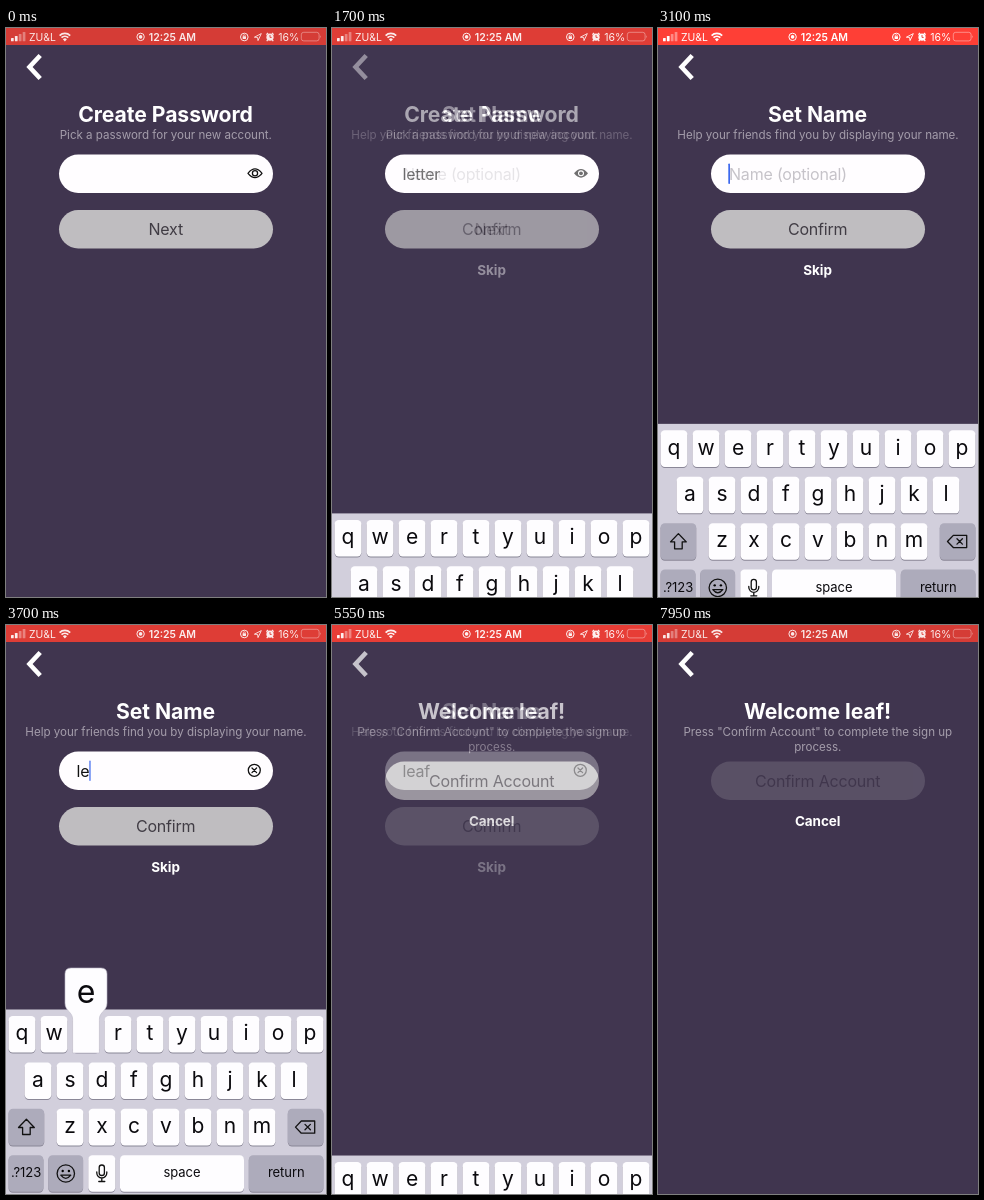
An HTML page that plays this animation: 320 px wide and 569 px high, repeating every 8 s.

```html
<!DOCTYPE html>
<html lang="en">
<head>
<meta charset="utf-8">
<title>Sign up</title>
<style>
html, body { margin: 0; width: 100%; height: 100%; overflow: hidden; background: #40354f; }
svg { display: block; width: 100%; height: 100%; font-family: Inter, Roboto, sans-serif; }
#pages { isolation: isolate; }
#pages > g { mix-blend-mode: plus-lighter; }
.title { font-size: 21.2px; font-weight: 700; letter-spacing: -.08px; fill: #fff; }
.sub { font-size: 11.6px; letter-spacing: -.02px; fill: #a49dab; }
.body { font-size: 16px; letter-spacing: -.2px; }
.link { font-size: 13.5px; font-weight: 700; letter-spacing: -.1px; fill: #fff; }
.key { font-size: 21px; fill: #0b0a0e; }
.cap { font-size: 13px; letter-spacing: -.05px; fill: #0b0a0e; }
.line { fill: none; stroke: #111; stroke-width: 1.3; stroke-linecap: round; stroke-linejoin: round; }
</style>
</head>
<body>
<svg id="stage" viewBox="0 0 320 569" preserveAspectRatio="none"></svg>
<script>
const LOOP = 8000;
const NAME = 'leaf', PASS = 'letter';
const $ = id => document.getElementById(id);
const clamp = v => Math.max(0, Math.min(1, v));

const text = (x, y, cls, s, more = 'text-anchor="middle"') =>
  `<text x="${x}" y="${y}" class="${cls}" ${more}>${s}</text>`;
const box = (x, y, w, h, r, fill, more = '') =>
  `<rect x="${x}" y="${y}" width="${w}" height="${h}" rx="${r}" fill="${fill}" ${more}/>`;
const line = (d, more = '') => `<path class="line" d="${d}" ${more}/>`;
const circle = (x, y, r, more) => `<circle cx="${x}" cy="${y}" r="${r}" ${more}/>`;

// Pages
const back = '<path id="back" d="M34.2 27.5L23.5 39L34.2 50.5" fill="none" stroke="#fff" stroke-width="4.6"/>';
const button = (id, y, label) =>
  `<g id="${id}">${box(53, y, 214, 38.5, 19.25, '#bfbdc0')}${text(159.7, y + 25.3, 'body', label, 'text-anchor="middle" fill="#403c44"')}</g>`;
const field = (id, extra) =>
  box(53, 126.5, 214, 38.5, 19.25, '#fffdff') + extra +
  text(70.5, 151.5, 'body', '', `id="${id}" fill="#111"`) +
  box(70, 135.5, 1.7, 20.5, .8, '#3d68ee', `id="${id}Caret"`);
const page = (id, title, body) =>
  `<g id="${id}">${box(0, 0, 320, 569, 0, '#40354f')}${text(159.5, 94, 'title', title)}${body}</g>`;

const lid = 'M242 145.3Q249 136.6 256 145.3Q249 154 242 145.3Z';
const eyes =
  `<g id="eyeOpen">${line(lid)}${circle(249, 145.3, 2.6, 'class="line"')}</g>` +
  `<g id="eyeFull"><path d="${lid}"/>${circle(249, 145.3, 3, 'fill="#fff"')}${circle(249, 145.3, 1.9, '')}</g>`;
const clear = `<g id="clear">${circle(248.3, 145.3, 6, 'class="line"')}${line('M246 143l4.6 4.6M250.6 143l-4.6 4.6')}</g>`;

const pages =
  page('welcome', `Welcome ${NAME}!`,
    text(159.8, 111, 'sub', 'Press "Confirm Account" to complete the sign up') +
    text(159.8, 125.5, 'sub', 'process.') +
    button('finish', 136.5, 'Confirm Account') + text(159.6, 201, 'link', 'Cancel')) +
  page('setName', 'Set Name',
    text(160, 111, 'sub', 'Help your friends find you by displaying your name.') +
    field('name', text(71, 151.5, 'body', 'Name (optional)', 'id="hint" fill="#c6c3c9"') + clear) +
    button('confirm', 182, 'Confirm') + text(159.6, 246.7, 'link', 'Skip')) +
  page('password', 'Create Password',
    text(159.8, 111, 'sub', 'Pick a password for your new account.') +
    field('pass', eyes) + button('next', 182, 'Next'));

// Keyboard
const ROWS = [['qwertyuiop', 16, 391], ['asdfghjkl', 32, 437.4], ['zxcvbnm', 64, 483.8]];
const DARK = '#adabbb';
const keyBox = (x, y, w, fill = '#fefdff') =>
  box(x, y + 1, w, 36.6, 4.2, '#8a8797') + box(x, y, w, 36.6, 4.2, fill);
const mic = x =>
  box(x - 2.6, 540, 5.2, 10.5, 2.6, 'none', 'class="line"') +
  line(`M${x - 5} 547v1a5 5 0 0 0 10 0v-1M${x} 553v3.5M${x - 3} 556.5h6`);
const space = (x, w) => keyBox(x, 530.2, w) + text(x + w / 2, 552.4, 'cap', 'space');

const letters = ROWS.map(([chars, x0, y]) => [...chars].map((c, i) =>
  keyBox(x0 + 32 * i - 13.4, y, 26.8) + text(x0 + 32 * i, y + 24.3, 'key', c)).join('')).join('');
const keyboard = `<g id="keyboard">${box(0, 384.5, 320, 190, 0, '#d2cfdc')}${letters}` +
  keyBox(2.6, 483.8, 35.6, DARK) +
  line('M20.4 494.3L28.3 502.5H24.2V509.5H16.6V502.5H12.5Z') +
  keyBox(281.8, 483.8, 35.6, DARK) +
  line('M289.5 502.1L295.3 496H308.7V508.2H295.3ZM299 499.4l5.4 5.4M304.4 499.4l-5.4 5.4') +
  keyBox(2.6, 530.2, 34.8, DARK) + text(20, 552.4, 'cap', '.?123') +
  keyBox(242.8, 530.2, 74.6, DARK) + text(280.3, 552.4, 'cap', 'return') +
  `<g id="plainRow">${keyBox(42.3, 530.2, 34.8, DARK)}${mic(59.8)}${space(82, 156)}</g>` +
  `<g id="emojiRow">${keyBox(42.3, 530.2, 34.8, DARK)}${circle(59.8, 548.5, 8.7, 'class="line"')}` +
  circle(56.7, 546, 1.2, '') + circle(62.9, 546, 1.2, '') + line('M54.8 550.2q5 6.4 10 0z') +
  keyBox(82.3, 530.2, 27) + mic(95.8) + space(114, 124) + '</g>' +
  '<g id="popup"><path d="M-13.4 37V3C-13.4 -4 -21 -5 -21 -13V-42Q-21 -48 -15 -48H15Q21 -48 21 -42V-13C21 -5 13.4 -4 13.4 3V37Z" fill="#fefdff" stroke="#bbb8c6" stroke-width=".6"/>' +
  text(0, -13, 'key', '', 'id="popChar" text-anchor="middle" style="font-size:32px"') + '</g></g>';

// Status bar
const white = 'fill="none" stroke="#fff"';
const bars = [0, 1, 2, 3].map(i =>
  box(5 + 3.9 * i, 10 - 2 * i, 2.7, 3.3 + 2 * i, .6, '#fff', i > 1 ? 'opacity=".4"' : '')).join('');
const status = box(0, 0, 320, 17, 0, '#d63c37', 'id="bar"') + '<g id="info" fill="#fff">' + bars +
  text(23, 12.7, '', 'ZU&amp;L', 'font-size="10.4"') +
  `<path d="M53.6 7.6a7.6 7.6 0 0 1 10.6 0M55.5 9.7a4.9 4.9 0 0 1 6.8 0" ${white} stroke-width="1.7"/>` +
  '<path d="M56.9 11.2a3 3 0 0 1 4 0l-2 2.2z"/>' +
  circle(134.6, 8.9, 3.7, white) + circle(134.6, 8.9, 1.8, '') +
  text(166.4, 12.7, '', '12:25 AM', 'font-size="10.5" font-weight="600" text-anchor="middle"') +
  circle(238.3, 9, 3.8, white) + box(236.6, 8.3, 3.4, 2.6, .4, '#fff') +
  `<path d="M237.3 8.5v-.8a1 1 0 0 1 2 0v.8" ${white} stroke-width=".7"/>` +
  `<path d="M248.4 9.2L255.3 5.6L252 12.6L251.6 9.4Z" ${white} stroke-linejoin="round" stroke-width=".9"/>` +
  circle(264, 9.2, 3.6, '') +
  `<path d="M260.3 6.6l1.8-1.6M267.7 6.6l-1.8-1.6M261.7 12l-1 1.2M266.3 12l1 1.2" ${white} stroke-width="1.2"/>` +
  '<path d="M264 7v2.4h1.7" fill="none" stroke="#e03d37" stroke-width=".9"/>' +
  text(272.3, 12.7, '', '16%', 'font-size="10.5"') +
  box(295.3, 4.3, 17.8, 8.6, 2.4, 'none', 'stroke="#fff" stroke-opacity=".45" stroke-width=".9"') +
  '<path d="M314.3 7.2q1.6 1.4 0 2.8z" opacity=".5"/></g>';

$('stage').innerHTML = `<g id="pages">${pages}</g>` + back + keyboard + status;

// Timing in ms
const PASS_TYPE = 420, PASS_STEP = 65, NAME_TYPE = 3520, NAME_STEP = 180;
const NAV = [1600, 5390];
const KEYS = [[60, NAV[0]], [2851, NAV[1]]];

const show = (id, on) => $(id).setAttribute('opacity', +on);
// Critically damped slide used for the keyboard
const spring = ms => {
  const x = Math.max(0, ms) * .018;
  return 1 - Math.exp(-x) * (1 + x);
};
const fade = (t, start) => clamp((t - start) / 230);
const press = (t, down, up) =>
  t < up ? 1 - .8 * clamp((t - down) / 150) : .2 + .8 * clamp((t - up) / 250);
const blink = (t, peak) => clamp(.5 + 1.6 * Math.cos((t - peak) * Math.PI / 500));
const typed = (s, t, start, step) => s.slice(0, Math.max(0, Math.floor((t - start) / step) + 1));

function setField(id, value, caret) {
  const el = $(id);
  if (el.textContent !== value) el.textContent = value;
  $(id + 'Caret').setAttribute('x', 70.3 + (value ? el.getComputedTextLength() : 0));
  show(id + 'Caret', caret);
}

function drawPopup(t) {
  const i = Math.floor((t - NAME_TYPE) / NAME_STEP);
  const on = i >= 0 && i < NAME.length && (t - NAME_TYPE) % NAME_STEP < 110;
  show('popup', on);
  if (!on) return;
  const c = NAME[i], [chars, x0, y] = ROWS.find(row => row[0].includes(c));
  $('popup').setAttribute('transform', `translate(${x0 + 32 * chars.indexOf(c)} ${y})`);
  $('popChar').textContent = c;
}

function draw(t) {
  const glow = .5 - .5 * Math.cos(t * Math.PI / 1000);
  $('bar').setAttribute('fill', `rgb(${213 + 42 * glow},${60 + 3 * glow},54)`);
  show('info', .88 + .12 * glow);

  // The arrow belongs to the arriving page only
  const [first, last] = NAV.map(start => fade(t, start));
  show('password', 1 - first);
  show('setName', first - last);
  show('welcome', last);
  show('back', t < NAV[0] ? 1 : t < NAV[1] ? first : last);

  setField('pass', typed(PASS, t, PASS_TYPE, PASS_STEP), t > 120 && t < NAV[0] ? blink(t, 575) : 0);
  show('eyeOpen', t < 360);
  show('eyeFull', t >= 360);

  const name = typed(NAME, t, NAME_TYPE, NAME_STEP);
  setField('name', name, t > KEYS[1][0] && t < NAV[1] ? blink(t, 2930) : 0);
  show('hint', !name);
  show('clear', !!name);

  show('next', press(t, 1250, 1600));
  show('confirm', press(t, 5180, 5400));
  show('finish', press(t, 7730, LOOP));

  const second = t >= KEYS[1][0];
  const [up, down] = KEYS[+second];
  const raised = t < down ? spring(t - up) : 1 - spring(t - down);
  $('keyboard').setAttribute('transform', `translate(0 ${186 * (1 - raised)})`);
  show('plainRow', !second);
  show('emojiRow', second);
  drawPopup(t);
}

const begin = performance.now();
function tick() {
  draw((performance.now() - begin) % LOOP);
  requestAnimationFrame(tick);
}
tick();
</script>
</body>
</html>
```
